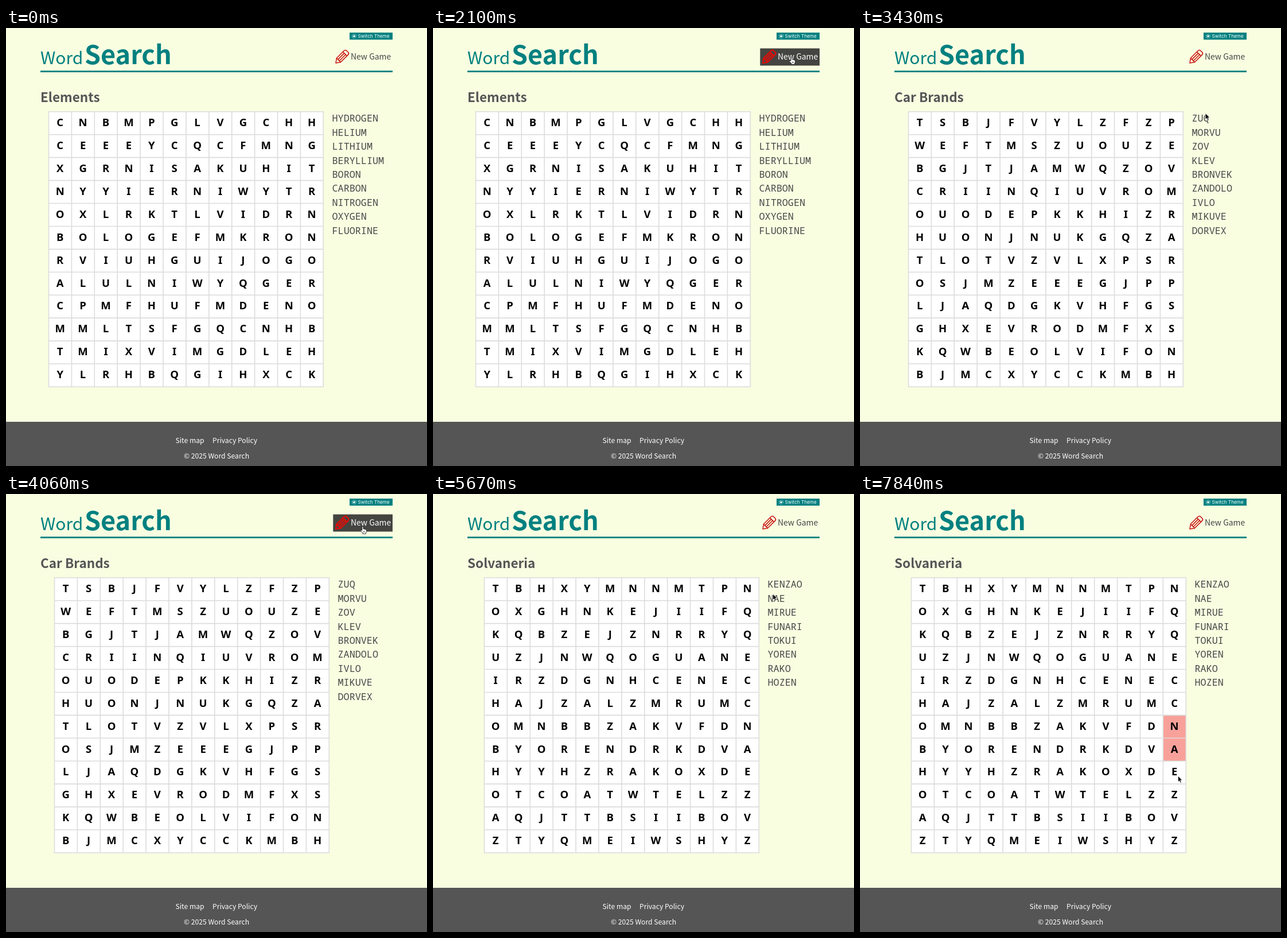
An HTML page for the animation above (8 s loop, 734 by 763 pixels).

```html
<!DOCTYPE html>
<html lang="en">
<head>
<meta charset="utf-8">
<title>Word Search</title>
<style>
  html, body { margin: 0; width: 100%; height: 100%; overflow: hidden; background: #f9fee1; }
  svg { display: block; }
  text { font-family: "Noto Sans CJK SC", "Noto Sans CJK JP", "Noto Sans", sans-serif; }
  .teal { fill: #008080; }
  .bold { font-weight: 700; }
  .footer text { font-size: 12.15px; fill: #fff; }
  .letters text { font: 600 18.5px "Noto Sans", "Open Sans", sans-serif; text-anchor: middle; }
  .words text { font: 16.8px "Noto Sans Mono", monospace; fill: #484848; }
  .button rect { fill: none; }
  .button text { font-size: 13.95px; fill: #444; }
  .button g { fill: none; stroke: #c8100c; stroke-width: 1.5; stroke-linejoin: round; stroke-linecap: round; }
  .button.hover rect { fill: #444440; }
  .button.hover text { fill: #fff; }
  .button.hover g { stroke: #e00d08; stroke-width: 2.2; }
</style>
</head>
<body>
<svg width="734" height="763" viewBox="0 0 734 763">
  <rect width="734" height="763" fill="#f9fee1"/>

  <text class="teal" x="60" y="62.5" font-size="30">Word</text>
  <text class="teal bold" x="137" y="62.5" font-size="45">Search</text>
  <rect class="teal" x="60" y="74.3" width="614" height="2.8"/>

  <rect class="teal" x="599" y="8" width="75" height="12.3"/>
  <g transform="translate(607 14.2)" fill="#fff" stroke="#fff">
    <circle r="1.7" stroke="none"/>
    <circle r="3.4" fill="none" stroke-width="1.4" stroke-dasharray="0.9 1.77"/>
  </g>
  <text x="613.6" y="17.2" fill="#fff" style="font: 8.2px Inter, sans-serif">Switch Theme</text>

  <g id="button" class="button">
    <rect x="570.3" y="35.5" width="103.7" height="30"/>
    <g transform="translate(575 61) rotate(-45)">
      <path d="M0 0L7 -5H25Q28.5 -5 28.5 -2V2Q28.5 5 25 5H7ZM7 -5V5M22.5 -5V5M7 -1.7H22.5M7 1.7H22.5"/>
    </g>
    <text x="601" y="55">New Game</text>
  </g>

  <text id="title" class="bold" x="60" y="128.7" font-size="22.5" fill="#555"></text>
  <g id="board">
    <rect x=".5" y="145.8" width="478.8" height="479.2" fill="#fff"/>
    <rect id="mark0" x="439.4" y="385.4" width="39.9" height="39.9" fill="#f8a19a"/>
    <rect id="mark1" x="439.4" y="425.3" width="39.9" height="39.9" fill="#f8a19a"/>
    <path id="lines" fill="none" stroke="#dcdcdc" stroke-width="1.6" stroke-linecap="square"/>
    <g id="letters" class="letters"></g>
    <g id="words" class="words"></g>
  </g>

  <g class="footer">
    <rect y="686" width="734" height="77" fill="#555"/>
    <text x="295.5" y="722.6">Site map</text>
    <text x="360" y="722.6">Privacy Policy</text>
    <text x="367" y="749.8" text-anchor="middle">© 2025 Word Search</text>
  </g>

  <g id="cursor">
    <path id="arrow" d="M0 0V10.7L2.4 8.5 4 12.2 5.8 11.4 4.2 7.8H7.5Z" stroke="#fff" stroke-width=".8"/>
    <path id="hand" d="M-1.2 7V1Q-1.2 0 -.1 0T1 1V4.4Q2.2 3.8 2.9 4.8 4.2 4.3 4.8 5.4 6.3 5.1 6.4 6.6V9Q6.3 10.5 5.4 11.4V12.8H-.1V11.6L-3.4 7.8Q-3.8 6.6 -2.8 6.3 -2 6.2 -1.2 7ZM1.3 8.2V10.6M3.1 8.2V10.6" fill="#fff" stroke="#111" stroke-width=".8"/>
  </g>
</svg>
<script>
const LOOP = 8000, SIZE = 12, PITCH_X = 39.9, PITCH_Y = 39.93;

const puzzles = [
  { start: 0, x: 74, title: "Elements",
    words: "HYDROGEN HELIUM LITHIUM BERYLLIUM BORON CARBON NITROGEN OXYGEN FLUORINE",
    rows: "CNBMPGLVGCHH CEEEYCQCFMNG XGRNISAKUHIT NYYIERNIWYTR OXLRKTLVIDRN BOLOGEFMKRON " +
          "RVIUHGUIJOGO ALULNIWYQGER CPMFHUFMDENO MMLTSFGQCNHB TMIXVIMGDLEH YLRHBQGIHXCK" },
  { start: 2660, x: 84, title: "Car Brands",
    words: "ZUQ MORVU ZOV KLEV BRONVEK ZANDOLO IVLO MIKUVE DORVEX",
    rows: "TSBJFVYLZFZP WEFTMSZUOUZE BGJTJAMWQZOV CRIINQIUVROM OUODEPKKHIZR HUONJNUKGQZA " +
          "TLOTVZVLXPSR OSJMZEEEGJPP LJAQDGKVHFGS GHXEVRODMFXS KQWBEOLVIFON BJMCXYCCKMBH" },
  { start: 4130, x: 89, title: "Solvaneria",
    words: "KENZAO NAE MIRUE FUNARI TOKUI YOREN RAKO HOZEN",
    rows: "TBHXYMNNMTPN OXGHNKEJIIFQ KQBZEJZNRRYQ UZJNWQOGUANE IRZDGNHCENEC HAJZALZMRUMC " +
          "OMNBBZAKVFDN BYORENDRKDVA HYYHZRAKOXDE OTCOATWTELZZ AQJTTBSIIBOV ZTYQMEIWSHYZ" },
];

// Pointer tip: [time, x, y]
const pointerPath = [
  [630, 394, 735], [840, 520, 420], [1050, 655, 150], [1190, 645, 88], [1330, 627, 114],
  [1400, 627, 115], [1750, 638, 82], [2100, 625, 50.5], [2870, 625, 50.5], [3010, 610, 51.5],
  [3150, 610, 51.5], [3430, 602, 149], [3640, 622, 56.5], [4620, 622, 56.5], [4760, 586.5, 100],
  [4970, 549, 150], [5180, 562, 186], [5320, 579, 184], [5390, 579, 184], [5530, 592.5, 174],
  [6440, 592.5, 174], [6720, 549, 422], [7280, 549, 422], [7490, 552, 442], [7630, 552, 442],
  [7840, 554.5, 491],
];

const $ = id => document.getElementById(id);
const clamp = v => Math.max(0, Math.min(1, v));
const show = (id, on) => $(id).setAttribute("visibility", on ? "visible" : "hidden");
const label = (s, x, y) => `<text x="${x}" y="${y}">${s}</text>`;

let grid = "";
for (let i = 0; i <= SIZE; i++) {
  grid += `M${0.5 + i * PITCH_X} 145.8v${SIZE * PITCH_Y}M.5 ${145.8 + i * PITCH_Y}h${SIZE * PITCH_X}`;
}
$("lines").setAttribute("d", grid);

function pointerAt(t) {
  const next = pointerPath.findIndex(p => p[0] > t);
  if (next < 0) return pointerPath.at(-1).slice(1);
  const [t0, x0, y0] = pointerPath[next - 1], [t1, x1, y1] = pointerPath[next];
  const k = (t - t0) / (t1 - t0);
  return [x0 + (x1 - x0) * k, y0 + (y1 - y0) * k];
}

let current;
function setPuzzle(puzzle) {
  if (puzzle === current) return;
  current = puzzle;
  $("title").textContent = puzzle.title;
  $("board").setAttribute("transform", `translate(${puzzle.x})`);
  $("letters").innerHTML = puzzle.rows.split(" ").map((row, j) =>
    [...row].map((c, i) => label(c, 20.2 + i * PITCH_X, 171 + j * PITCH_Y)).join("")).join("");
  $("words").innerHTML = puzzle.words.split(" ").map((w, i) => label(w, 494.5, 163.3 + i * 24.4)).join("");
}

function draw() {
  const t = performance.now() % LOOP;
  setPuzzle(puzzles.findLast(p => t >= p.start));

  const visible = t >= pointerPath[0][0];
  const [x, y] = visible ? pointerAt(t) : [0, 0];
  const hover = visible && x > 570 && x < 674 && y > 35 && y < 66;
  $("cursor").setAttribute("transform", `translate(${x} ${y})`);
  show("arrow", visible && !hover);
  show("hand", hover);
  $("button").classList.toggle("hover", hover);

  $("mark0").setAttribute("opacity", clamp((t - 6930) / 280));
  $("mark1").setAttribute("opacity", clamp((t - 7630) / 210));
  requestAnimationFrame(draw);
}
draw();
</script>
</body>
</html>
```
